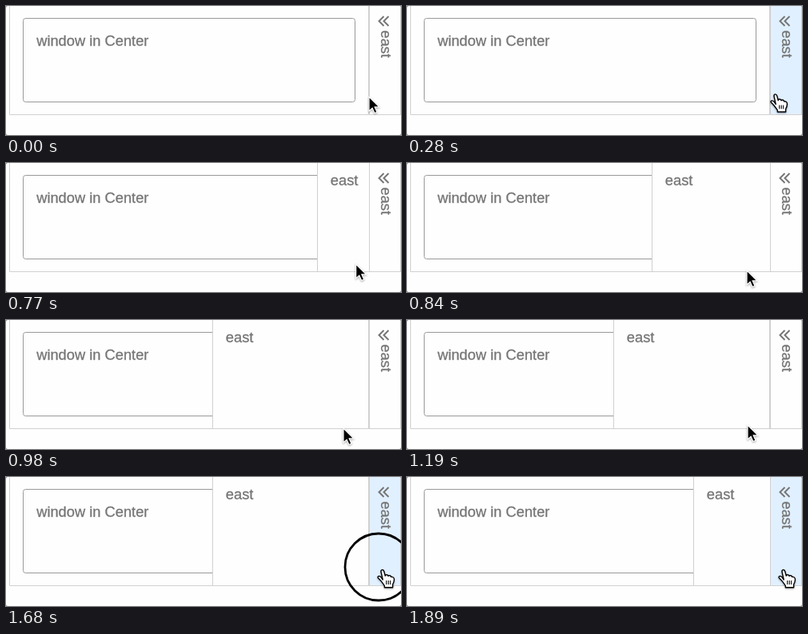
Recreate the animation shown at these times as an HTML page. Size 494 by 162 pixels, loop 1960 ms.

```html
<!DOCTYPE html>
<html lang="en">
<head>
<meta charset="utf-8">
<title>East panel</title>
<style>
  html, body { margin: 0; width: 100%; height: 100%; overflow: hidden; background: #8c8c8c; }
  svg { display: block; background: #fefefe; border-radius: 2.5px; }
  text { font: 18.3px "Liberation Sans", Arial, sans-serif; fill: #757575; stroke: #757575; stroke-width: .3px; }
  .line { fill: none; stroke: #d0d0d0; }
  .cursor { filter: drop-shadow(0 1px 1px rgba(0, 0, 0, .35)); }
</style>
</head>
<body>
<svg width="494" height="162" viewBox="0 0 494 162">
  <clipPath id="center"><rect width="454" height="162"/></clipPath>
  <path class="line" d="M4.5 0V136.5H453.5V0"/>
  <rect x="21.5" y="15.5" width="415" height="105" rx="3" fill="none" stroke="#999"/>
  <text x="38.2" y="50">window in Center</text>

  <g clip-path="url(#center)">
    <g id="panel">
      <rect x=".5" y="-2" width="195" height="138.5" fill="#fefefe" stroke="#d0d0d0"/>
      <text x="16.8" y="28">east</text>
    </g>
  </g>

  <rect id="strip" x="454.5" y="-2" width="39" height="138.5" stroke="#d0d0d0"/>
  <path d="M472.5 13l-6 6 6 6M478.5 13l-6 6 6 6" fill="none" stroke="#757575" stroke-width="2"/>
  <text transform="translate(468.5 30.5) rotate(90)">east</text>

  <circle id="ring" r="42" fill="none" stroke="#000" stroke-width="2.8"/>
  <g id="arrow" class="cursor">
    <path d="M0 0V18L4.1 14.2 6.9 20.5 10 19.2 7.2 12.9H12.8Z" fill="#000" stroke="#fff" stroke-width="1.2"/>
  </g>
  <g id="hand" class="cursor">
    <g transform="translate(-5.8 -1.5) scale(1.08)" fill="#fff" stroke="#000" stroke-width="1.3" stroke-linejoin="round">
      <path d="M6.5 12.5L4.6 4Q4 1.4 5.6 1Q7.3 .6 8 3L9.3 8Q9.4 6.6 11 6.7Q12.7 6.8 12.8 8.3Q13.3 7.3 14.6 7.6Q16 8 16.2 9.4Q17 8.8 18.2 9.5Q20 10.5 19.7 12.5Q19.5 15.5 18 18V21.5H8.5V19.5Q6.5 16.5 4.5 14Q2.5 11.8 1.2 10.6Q.2 9.2 1.5 8.5Q3 8 4.5 9.6Z"/>
      <path d="M10.7 13.5v4.5M13 13.5v4.5M15.3 13.5v4.5" stroke-width="1"/>
    </g>
  </g>
</svg>
<script>
const LOOP = 1960, STEP = 70;
const $ = id => document.getElementById(id);

// Pointer tip: time, x, y
const path = [
  [0, 454, 114], [140, 454, 114], [350, 463, 110], [560, 463, 110],
  [630, 463, 111], [840, 425, 135], [980, 422, 136], [1120, 422, 136],
  [1190, 426, 132], [1470, 455, 115], [1680, 470, 117], [LOOP, 470, 117]
];

function pointer(t) {
  const i = path.findIndex(k => k[0] > t);
  const [t0, x0, y0] = path[i - 1], [t1, x1, y1] = path[i];
  const p = (t - t0) / (t1 - t0);
  return [x0 + (x1 - x0) * p, y0 + (y1 - y0) * p];
}

function ease(t, start, length = 250) {
  const p = Math.min(1, Math.max(0, (t - start) / length));
  return (1 - Math.cos(Math.PI * p)) / 2;
}

const show = (el, on) => el.setAttribute("visibility", on ? "visible" : "hidden");
const move = (el, x, y) => el.setAttribute("transform", `translate(${x} ${y})`);

function draw(now) {
  const t = Math.floor(now % LOOP / STEP) * STEP;
  const [x, y] = pointer(t);
  const hover = x > 455.5;
  const pressed = t === 560 || t === 1680;
  const open = ease(t, 672) - ease(t, 1763);

  move($("panel"), Math.round(454 - 196 * open), 0);
  show($("panel"), open > 0);
  $("strip").setAttribute("fill", hover ? "#e1f0ff" : "#fefefe");
  move($("arrow"), x, y);
  move($("hand"), x, y);
  move($("ring"), x - 4, y - 4);
  show($("arrow"), !hover);
  show($("hand"), hover);
  show($("ring"), pressed);
  requestAnimationFrame(draw);
}
draw(0);
</script>
</body>
</html>
```
